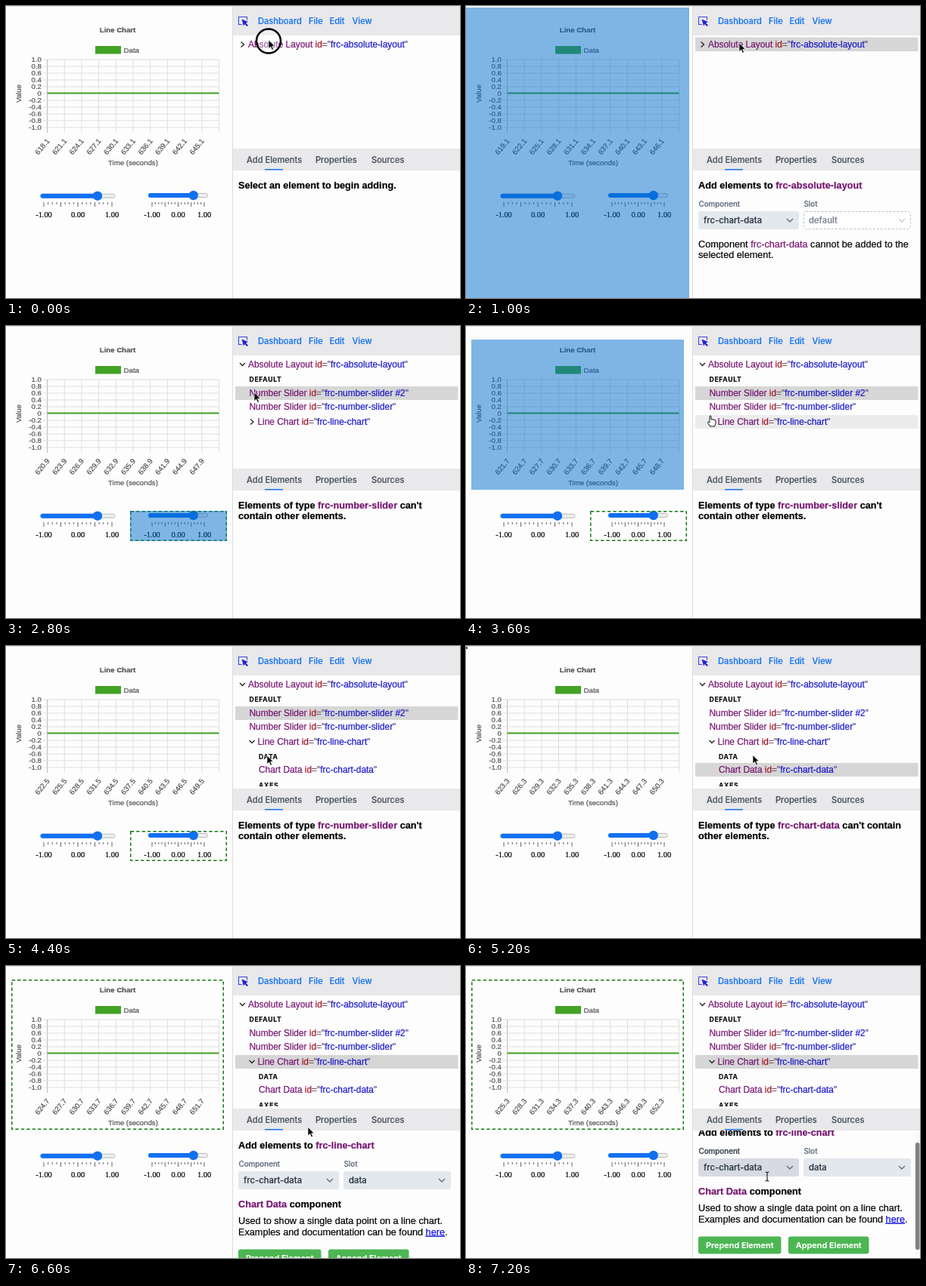
An HTML page for the animation above (7400 ms loop, 600x387 px).

```html
<!DOCTYPE html>
<html lang="en">
<head>
<meta charset="utf-8">
<style>
  html, body { margin: 0; width: 100%; height: 100%; overflow: hidden; background: #fefdfe; }
  svg { display: block; width: 600px; height: 387px; font-family: "Liberation Sans", Arial, sans-serif; }
  text { white-space: pre; stroke-width: .2px; }
  .ui { font-family: Inter, sans-serif; font-weight: 500; }
  .serif { font-family: "Liberation Serif", serif; }
  .b { font-weight: 700; }
  .end { text-anchor: end; }
  .mid { text-anchor: middle; }
  .caps { font-family: Inter, sans-serif; font-weight: 700; letter-spacing: .7px; }
</style>
</head>
<body>
<svg id="stage" viewBox="0 0 600 387"></svg>
<script>
const LOOP = 7400, STEP = 200;
const BLUE = '#1a76f2', GREEN = '#43a322', PURPLE = '#75146f', BAR = '#e9e8ea', INK = '#505050';

// Cursor path: time, x, y
const PATH = [
  [0, 347, 45], [400, 348, 46], [1000, 361, 49], [1200, 335, 110], [1400, 270, 200],
  [1600, 218, 258], [1800, 216, 263], [2200, 216, 263], [2600, 300, 150], [2800, 328, 88],
  [3200, 324, 122], [4200, 324, 122], [4400, 345, 145], [4600, 375, 160], [5000, 379, 157],
  [5200, 379, 144.5], [5600, 394, 121], [6000, 394, 119.5], [6400, 400, 165], [6800, 398, 262], [7200, 398, 279]
];
const CLICKS = [0, 1800, 3800, 4600, 5600];

// Tree rows: top, height, text x, type, id, box on the dashboard
const ROWS = {
  layout: [41.5, 18.5, 320, 'Absolute Layout', 'frc-absolute-layout', [0, 2, 295, 385]],
  slider2: [80, 18, 321.5, 'Number Slider', 'frc-number-slider #2', [164, 245, 128, 40]],
  slider1: [98, 18, 321.5, 'Number Slider', 'frc-number-slider', [21, 245, 148, 40]],
  chart: [118, 18, 332.5, 'Line Chart', 'frc-line-chart', [7, 18, 281, 199]],
  data: [155, 18, 334, 'Chart Data', 'frc-chart-data', [0, 1, 2, 3]]
};

const rect = (x, y, w, h, fill, more = '') =>
  `<rect x="${x}" y="${y}" width="${w}" height="${h}" fill="${fill}" ${more}/>`;
const line = (d, stroke, width = 1, more = '') =>
  `<path d="${d}" fill="none" stroke="${stroke}" stroke-width="${width}" ${more}/>`;
// Text placed by the middle of its capitals
const text = (x, y, str, size, fill = '#000', cls = '', more = '') =>
  `<text x="${x}" y="${y + size * .36}" font-size="${size}" fill="${fill}" stroke="${fill}" class="${cls}" ${more}>${str}</text>`;
const span = (str, fill) => `<tspan fill="${fill}" stroke="${fill}">${str}</tspan>`;
const chevron = (x, y, color) => line(`M${x - 4} ${y - 2}l4 4 4-4`, color, 1.3);

function along(keys, t) {
  let i = 1;
  while (i < keys.length - 1 && keys[i][0] < t) i++;
  const a = keys[i - 1], b = keys[i];
  const p = Math.min(1, Math.max(0, (t - a[0]) / (b[0] - a[0])));
  return a.slice(1).map((v, k) => v + (b[k + 1] - v) * p);
}

function chart(t) {
  let s = text(147.5, 32, 'Line Chart', 9.6, INK, 'b mid') +
    rect(118, 53, 34, 10.5, GREEN) +
    text(155.5, 58.5, 'Data', 9.7, INK) +
    text(168, 208, 'Time (seconds)', 9.6, INK, 'mid') +
    text(0, 0, 'Value', 9.6, INK, 'mid', 'transform="translate(16.5 116) rotate(-90)"');
  for (let i = 0; i <= 10; i++) {
    const y = 71 + 9 * i, x = 54.5 + 22.7 * i, v = 1 - i / 5;
    s += line(`M49 ${y}H281.5`, '#dedede') + line(`M${x} 71V168`, i ? '#dedede' : '#bbb') +
      text(47, y, i === 5 ? '0' : v.toFixed(1), 9.7, INK, 'end');
    if (i < 10) s += text(0, 0, (618.1 + t / 1000 + 3 * i).toFixed(1), 9.6, INK, 'end',
      `transform="translate(${x + 1} 177) rotate(-50)"`);
  }
  return s + line('M54.5 115.600H281.5', GREEN, 2);
}

function slider(x, w, thumb, y, first, last) {
  let s = rect(x + .5, y - 2.5, w - 1, 5, '#efefef', 'rx="2.5" stroke="#bbb"') +
    rect(x, y - 3, thumb - x, 6, '#1070f0', 'rx="3"') +
    `<circle cx="${thumb}" cy="${y}" r="6.200" fill="#1070f0"/>`;
  for (let i = 0; i <= 16; i++)
    s += line(`M${first + (last - first) * i / 16} 260v${i % 4 ? 3 : 6}`, '#666');
  ['-1.00', '0.00', '1.00'].forEach((v, i) =>
    s += text(first + (last - first) * i / 2, 276.3, v, 10.4, '#000', 'serif mid'));
  return s;
}

function tree(selected, hover, open, expanded) {
  const shown = ['layout', ...(open ? ['slider2', 'slider1', 'chart'] : []), ...(expanded ? ['data'] : [])];
  let s = '';
  for (const key of shown) {
    const [y, h, x, type, id] = ROWS[key];
    if (key === selected || key === hover)
      s += rect(303, y, 294.5, h, key === selected ? '#d6d6d6' : '#ececec');
    s += text(x, y + h / 2, span(type, PURPLE) + span(' id', '#a31526') + span('="', '#6e5064') +
      span(id, '#1818cc') + span('"', '#4a4a90'), 11.9);
  }
  const caret = (x, y, down) => line(down ? `M${x - 3.5} ${y - 2}l3.5 3.5 3.5-3.5` : `M${x - 2} ${y - 3.5}l4 3.5-4 3.5`, '#222', 1.3);
  s += caret(312.5, 51, open);
  if (open) s += text(321.5, 71.3, 'DEFAULT', 8.6, '#111', 'caps') + caret(325, 127, expanded);
  if (expanded) s += text(334, 147, 'DATA', 8.6, '#111', 'caps') + text(334, 184.5, 'AXES', 8.6, '#111', 'caps');
  return `<g clip-path="url(#treeClip)">${s}</g>`;
}

function addForm(id, slot, dashed, hot) {
  const soft = '#5f6b7a', ink = '#2b3747';
  return text(307, 237, 'Add elements to ' + span(id, PURPLE), 12.7, '#000', 'b') +
    text(307.5, 262, 'Component', 9.8, hot ? ink : soft, 'ui') +
    text(446.5, 262, 'Slot', 9.8, soft, 'ui') +
    rect(307, 272, 133, 24, hot ? '#d7dae2' : '#e3e8ed', 'rx="3"') +
    text(314, 284, 'frc-chart-data', 11.3, ink, 'ui') + chevron(428, 284, soft) +
    (dashed ? rect(446.5, 272.5, 141, 23, '#fff', 'rx="3" stroke="#b9c1ca" stroke-dasharray="3 2"')
            : rect(446, 272, 142, 24, '#e3e8ed', 'rx="3"')) +
    text(453, 284, slot, 11.3, dashed ? '#7c8591' : ink, 'ui') + chevron(576, 284, dashed ? '#c4cad1' : soft);
}

function button(x, w, label) {
  return rect(x, 375.5, w, 23, '#4cb652', 'rx="3"') +
    text(x + w / 2, 387, label, 10.9, '#fff', 'ui mid', 'style="font-weight:600"');
}

function panel(selected, scroll, hot) {
  const para = (y, str, cls = '') => text(307, y, str, 12.7, '#000', cls);
  const refuse = (id, a, b) =>
    para(237, 'Elements of type ' + span(id, PURPLE) + a, 'b') + para(251.5, b, 'b');
  const views = {
    none: () => para(237, 'Select an element to begin adding.', 'b'),
    layout: () => addForm('frc-absolute-layout', 'default', true) +
      para(315, 'Component ' + span('frc-chart-data', PURPLE) + ' cannot be added to the') +
      para(329.5, 'selected element.'),
    slider2: () => refuse('frc-number-slider', " can't", 'contain other elements.'),
    data: () => refuse('frc-chart-data', " can't contain", 'other elements.'),
    chart: () => addForm('frc-line-chart', 'data', false, hot) +
      para(315, span('Chart Data', PURPLE) + ' component', 'b') +
      para(337.5, 'Used to show a single data point on a line chart.') +
      para(352, 'Examples and documentation can be found ' +
        '<tspan fill="#1010e8" stroke="#1010e8" text-decoration="underline">here</tspan>.') +
      button(307, 109.5, 'Prepend Element') + button(426, 106.5, 'Append Element')
  };
  return `<g clip-path="url(#panelClip)"><g transform="translate(0 ${-scroll})">${views[selected]()}</g></g>` +
    (scroll ? rect(593, 218, 7, 169, '#f9f9f9') + rect(594, 217 + scroll, 5.5, 142, '#808080', 'rx="2.5"') : '');
}

function chrome() {
  return line('M0 .5H600', '#e4e4e4') + line('M299.5 1V387', '#dcdcdc') +
    rect(300, 1, 300, 38, BAR) + rect(300, 189, 300, 29, BAR) +
    line('M312 24.5H307.5V14.5H318.5V18.5', '#3a4ad8', 1.1) +
    '<path d="M311.500 17.500L320 21 317 22.500 320 25.500 318.500 27 315.500 24 314 26.500Z" fill="#2424d8"/>' +
    [['Dashboard', 333], ['File', 400], ['Edit', 427.5], ['View', 457.5]]
      .map(([s, x]) => text(x, 20, s, 11.1, BLUE, 'ui')).join('') +
    [['Add Elements', 318], ['Properties', 409], ['Sources', 483]]
      .map(([s, x]) => text(x, 204, s, 11.1, '#4a5562', 'ui')).join('') +
    rect(342, 216, 24, 1.5, BLUE);
}

function pointer(t, x, y) {
  const shape = t >= 6800
    ? line('M-2.5-6Q0-6 0-4.5Q0-6 2.5-6M0-4.5V4.5M-2.5 6Q0 6 0 4.5Q0 6 2.5 6', '#111', 1.1)
    : t >= 3200 && t <= 4200
      ? '<path d="M-2-2Q-2-3-1-3T0-2V2Q1 1 2 2Q3 1.500 4 2.500Q6 2 6 4V7L4.500 11H-1.500L-4.500 6.500Q-5 5-3.500 5L-2 6Z" fill="#fff" stroke="#111"/>'
      : '<path d="M0 0V11.500L2.700 9 4.600 13.300 6.500 12.400 4.600 8.300H8.200Z" fill="#000" stroke="#fff" stroke-width=".7"/>';
  const ring = CLICKS.some(c => t >= c && t < c + 400)
    ? '<circle cy="1.500" r="16" fill="#fff" fill-opacity=".3" stroke="#000" stroke-width="2.500"/>' : '';
  return `<g transform="translate(${x} ${y})">${ring}${shape}</g>`;
}

function scene(t) {
  const [x, y] = along(PATH, t);
  const selected = t < 200 ? 'none' : t < 2000 ? 'layout' : t < 4800 ? 'slider2' : t < 5800 ? 'data' : 'chart';
  const open = t >= 2000, expanded = t >= 4000;
  const hover = t > 0 && x > 303 && Object.keys(ROWS).find(key => {
    const [top, h] = ROWS[key];
    return y >= top && y < top + h && (key === 'layout' || (open && (key !== 'data' || expanded)));
  });
  const [scroll] = along([[6600, 0], [7000, 17]], t);

  let s = '<clipPath id="treeClip"><path d="M300 39H600V186H300Z"/></clipPath>' +
    '<clipPath id="panelClip"><path d="M300 218H600V387H300Z"/></clipPath>' +
    chart(t) + slider(45.5, 99, 121, 251.7, 50, 140) + slider(188, 79, 247.7, 251, 193, 262);
  if (selected === 'data') s += rect(0, 1, 2, 3, '#127a12');
  else if (selected === 'slider2' || selected === 'chart') {
    const [bx, by, w, h] = ROWS[selected][5];
    s += rect(bx + .75, by + .75, w - 1.5, h - 1.5, 'none',
      'stroke="#127a12" stroke-width="1.5" stroke-dasharray="4.4 3"');
  }
  if (hover && hover !== 'data') s += rect(...ROWS[hover][5], 'rgba(0,110,204,.5)');
  return s + chrome() + tree(selected, hover, open, expanded) +
    panel(selected, scroll, t >= 6800) + pointer(t, x, y);
}

const stage = document.getElementById('stage');
let last = -1;
function tick() {
  const t = Math.floor(performance.now() % LOOP / STEP) * STEP;
  if (t !== last) stage.innerHTML = scene(last = t);
  requestAnimationFrame(tick);
}
tick();
</script>
</body>
</html>
```
